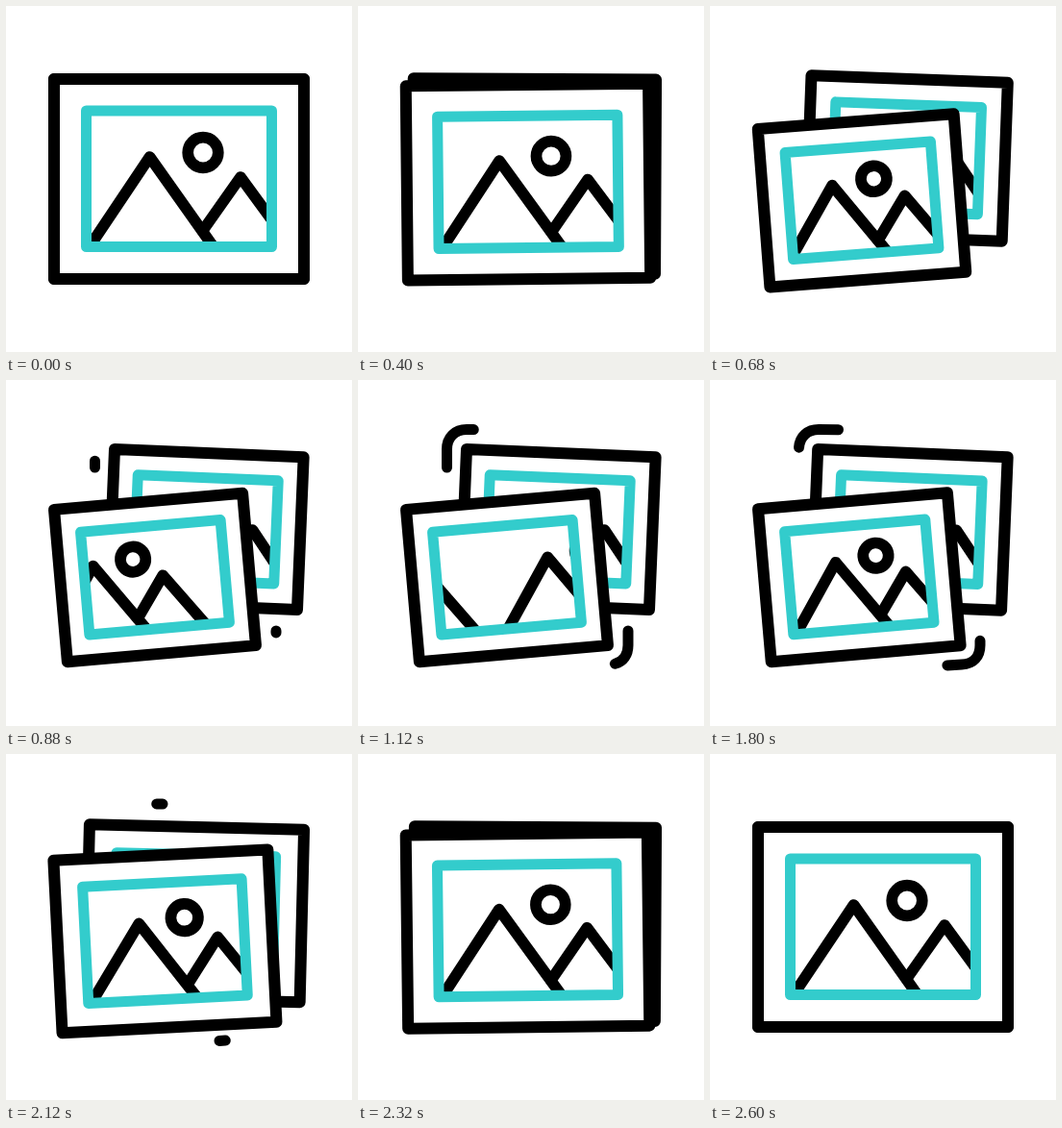
Write an HTML page that moves like this. It is 360 px wide and 360 px high and loops after 2.8 s.

```html
<!DOCTYPE html>
<html lang="en">
<head>
<meta charset="utf-8">
<title>Gallery icon</title>
<style>
  html, body { margin: 0; width: 100%; height: 100%; overflow: hidden; background: #fff; }
  svg { display: block; width: 100%; height: 100%; }
  rect, path, circle {
    fill: none; stroke: #000; stroke-width: 11.7;
    stroke-linejoin: round; stroke-linecap: round;
    vector-effect: non-scaling-stroke;
  }
  .card { fill: #fff; stroke-width: 12; }
  .mat { stroke: #33cccc; stroke-width: 11; }
  .dash { stroke-width: 11; }
</style>
</head>
<body>
<svg viewBox="0 0 360 360">
  <defs>
    <clipPath id="window"><rect x="-96.5" y="-71" width="193" height="141.5"/></clipPath>
    <!-- all picture parts are centred on 0,0 -->
    <g id="scene">
      <path d="M-99.5 80L-30.5 -23L42.5 80"/>
      <path d="M24.5 54L64 -2L124 80"/>
      <circle id="sun" cx="25" cy="-27.5" r="15.8"/>
    </g>
    <rect id="card" class="card" x="-130" y="-104" width="260" height="208"/>
    <rect id="mat" class="mat" x="-96.5" y="-71" width="193" height="141.5"/>
  </defs>
  <path class="dash" id="dashTop" d="M92.5 91V72C92.5 59.5 101 51.5 113 51.5L163 52"/>
  <path class="dash" id="dashLow" d="M281 261V276C281 288 274 295.5 262 296L222 298.5"/>
  <g id="back">
    <use href="#card"/>
    <g clip-path="url(#window)"><use href="#scene"/></g>
    <use href="#mat"/>
  </g>
  <g id="front">
    <use href="#card"/>
    <g clip-path="url(#window)">
      <g id="strip"><use href="#scene"/><use href="#scene" x="254"/></g>
    </g>
    <use href="#mat"/>
  </g>
</svg>
<script>
  const LOOP = 2800, STEP = 40, SPACING = 254;
  const $ = id => document.getElementById(id);
  const back = $('back'), front = $('front'), strip = $('strip'), sun = $('sun'), card = $('card');

  const clamp = u => Math.max(0, Math.min(1, u));
  const span = (t, a, b) => clamp((t - a) / (b - a));

  // Symmetric cubic-bezier(h, 0, 1 - h, 1)
  function ease(x, h) {
    if (x <= 0 || x >= 1) return clamp(x);
    let lo = 0, hi = 1;
    for (let i = 0; i < 24; i++) {
      const s = (lo + hi) / 2, r = 1 - s;
      if (3 * h * s * r * r + 3 * (1 - h) * s * s * r + s * s * s < x) lo = s; else hi = s;
    }
    return lo * lo * (3 - 2 * lo);
  }

  function place(el, p, dx, dy, turn) {
    const k = 1 - 0.243 * p;
    el.setAttribute('transform',
      `translate(${180 + dx * p} ${180 + dy * p}) rotate(${turn * p}) scale(${k})`);
    return k;
  }

  function makeDash(el, growStart, growEnd, leave) {
    const len = el.getTotalLength();
    return t => {
      const from = Math.pow(span(t, leave, 2140), 2) * len;
      const to = (0.7 * ease(span(t, growStart, growEnd), 0.4)
                + 0.3 * ease(span(t, 1760, 2120), 0.4)) * len;
      const size = to - from;
      el.style.display = size > 0.05 ? '' : 'none';
      el.style.strokeDasharray = `${Math.max(size, 0)} ${len * 3}`;
      el.style.strokeDashoffset = -from;
    };
  }

  const dashes = [
    makeDash($('dashTop'), 780, 1255, 1520),
    makeDash($('dashLow'), 820, 1315, 1620)
  ];

  function draw(t) {
    const p = ease(span(t, 200, 880), 0.6) - ease(span(t, 1700, 2600), 0.6);
    place(back, p, 28, -24.5, 2.4);
    const k = place(front, p, -25, 25.5, -5);
    card.setAttribute('y', -104 - p);
    card.setAttribute('height', 208 + 2 * p);
    sun.setAttribute('r', (5 + 10.8 * k) / k);
    const shift = SPACING * ease(span(t, 545, 1540), 0.5);
    strip.setAttribute('transform', `translate(${-shift} 0)`);
    dashes.forEach(d => d(t));
  }

  const start = performance.now();
  function tick() {
    const t = (performance.now() - start) % LOOP;
    draw(Math.floor(t / STEP) * STEP);
    requestAnimationFrame(tick);
  }
  tick();
</script>
</body>
</html>
```
